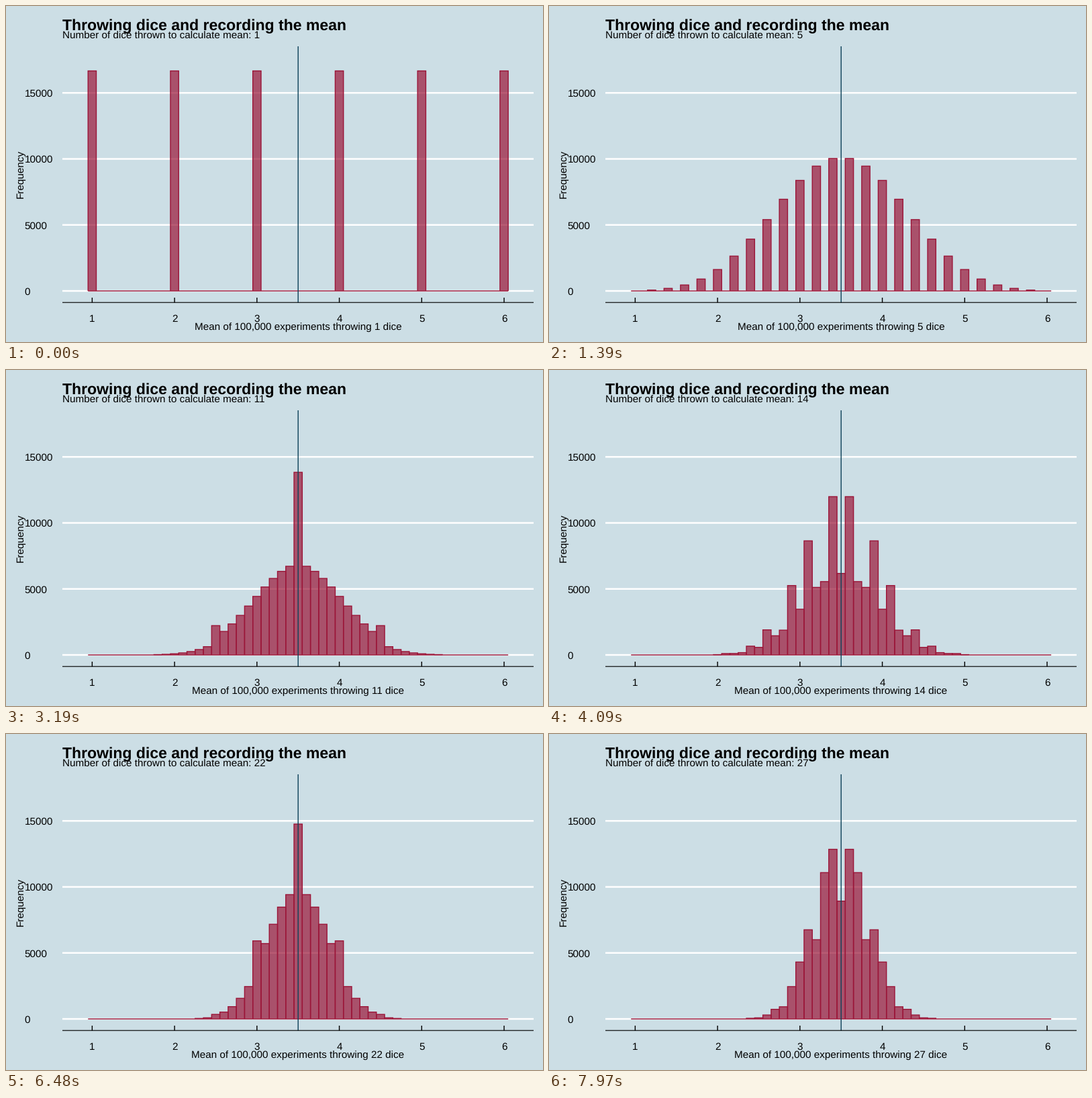
Write a matplotlib script that moves like this. It is 800 px wide and 500 px high and loops after 8 s.

```python
import numpy as np
import matplotlib.pyplot as plt
from matplotlib.animation import FuncAnimation
from matplotlib.collections import PolyCollection

plt.rcParams["font.family"] = "Liberation Sans"
plt.rcParams["text.hinting"] = "none"

WIDTH, HEIGHT, DPI = 800, 500, 100
LOOP_MS, STEP_MS = 8000, 20
MAX_DICE = 27
PT = 72 / DPI  # points per pixel
EXPERIMENTS = 100_000

PAPER, WINE, NAVY = "#ccdee5", "#9b1538", "#0d4259"
LEFT, RIGHT, TOP, FLOOR = 84, 786, 60, 441.2
BASE_SIZE, TITLE_SIZE = 15.25, 22.95


def px_x(value):
    return 435.2 + (value - 3.5) * 122.73


def px_y(count):
    return 424 - count * 98.23 / 5000


def histogram(dice):
    """Expected counts in 51 bins of width 0.1 centred on 1.0 to 6.0."""
    odds = np.ones(1)
    for _ in range(dice):
        odds = np.convolve(odds, np.ones(6) / 6)
    totals = np.arange(dice, 6 * dice + 1)
    # Bins are closed on the right, so ties fall into the lower one.
    tenths = -((dice - 20 * totals) // (2 * dice))
    return np.bincount(tenths - 10, odds * EXPERIMENTS, minlength=51)


def bar_outlines(dice):
    """Bars open at the bottom, where the base line closes them."""
    base = px_y(0)
    outlines = []
    for i, count in enumerate(histogram(dice)):
        if count < 20:  # under half a pixel
            continue
        x0, x1 = px_x(0.95 + i / 10), px_x(1.05 + i / 10)
        y = px_y(count)
        outlines.append([(x0, base), (x0, y), (x1, y), (x1, base)])
    return outlines


def start_ms(dice):
    """Each count lasts 300 ms, with one in eleven cut to 290 ms."""
    if dice == 1:
        return 0
    step = dice - 2
    return 500 + 300 * step - 10 * ((step + 10) // 11)


fig = plt.figure(figsize=(WIDTH / DPI, HEIGHT / DPI), dpi=DPI, facecolor=PAPER)
ax = fig.add_axes([0, 0, 1, 1])
ax.set_xlim(0, WIDTH)
ax.set_ylim(HEIGHT, 0)
ax.axis("off")


def line(x0, y0, x1, y1, color, width, z):
    ax.plot([x0, x1], [y0, y1], color=color, lw=width * PT, zorder=z,
            solid_capstyle="butt", snap=False)


def label(x, y, text, size=BASE_SIZE, **style):
    return ax.text(x, y, text, fontsize=size * PT, color="black",
                   va="baseline", zorder=5, **style)


for count in range(0, 15001, 5000):
    y = px_y(count)
    line(LEFT, y, RIGHT, y, "white", 2.5, 1)
    label(27.6, y + 5.8, str(count))

for face in range(1, 7):
    x = px_x(face)
    line(x, 434, x, FLOOR, "black", 1.42, 4)
    label(x, 470, str(face), ha="center")

line(LEFT, FLOOR, RIGHT, FLOOR, "black", 1.14, 4)
line(px_x(0.95), px_y(0), px_x(6.05), px_y(0), WINE, 1.42, 2)
line(px_x(3.5), TOP, px_x(3.5), FLOOR, NAVY, 1.42, 3)

label(83.8, 36, "Throwing dice and recording the mean", TITLE_SIZE, weight="bold")
label(25.2, 249.9, "Frequency", ha="center", rotation=90, rotation_mode="anchor")
subtitle = label(83.8, 49, "")
caption = label(435, 482, "", ha="center")

outlines = {dice: bar_outlines(dice) for dice in range(1, MAX_DICE + 1)}
starts = [start_ms(dice) for dice in outlines]

bars = PolyCollection(outlines[1], closed=False, facecolors=WINE + "b3",
                      edgecolors=WINE, linewidths=1.42 * PT, joinstyle="miter",
                      zorder=2, snap=False)
ax.add_collection(bars, autolim=False)


def update(frame):
    now = frame * STEP_MS + STEP_MS / 2
    dice = int(np.searchsorted(starts, now, side="right"))
    bars.set_verts(outlines[dice], closed=False)
    subtitle.set_text(f"Number of dice thrown to calculate mean: {dice}")
    caption.set_text(f"Mean of 100,000 experiments throwing {dice} dice")
    return bars, subtitle, caption


animation = FuncAnimation(fig, update, frames=LOOP_MS // STEP_MS, interval=STEP_MS,
                          repeat=True, repeat_delay=0, cache_frame_data=False)
plt.show()
```
